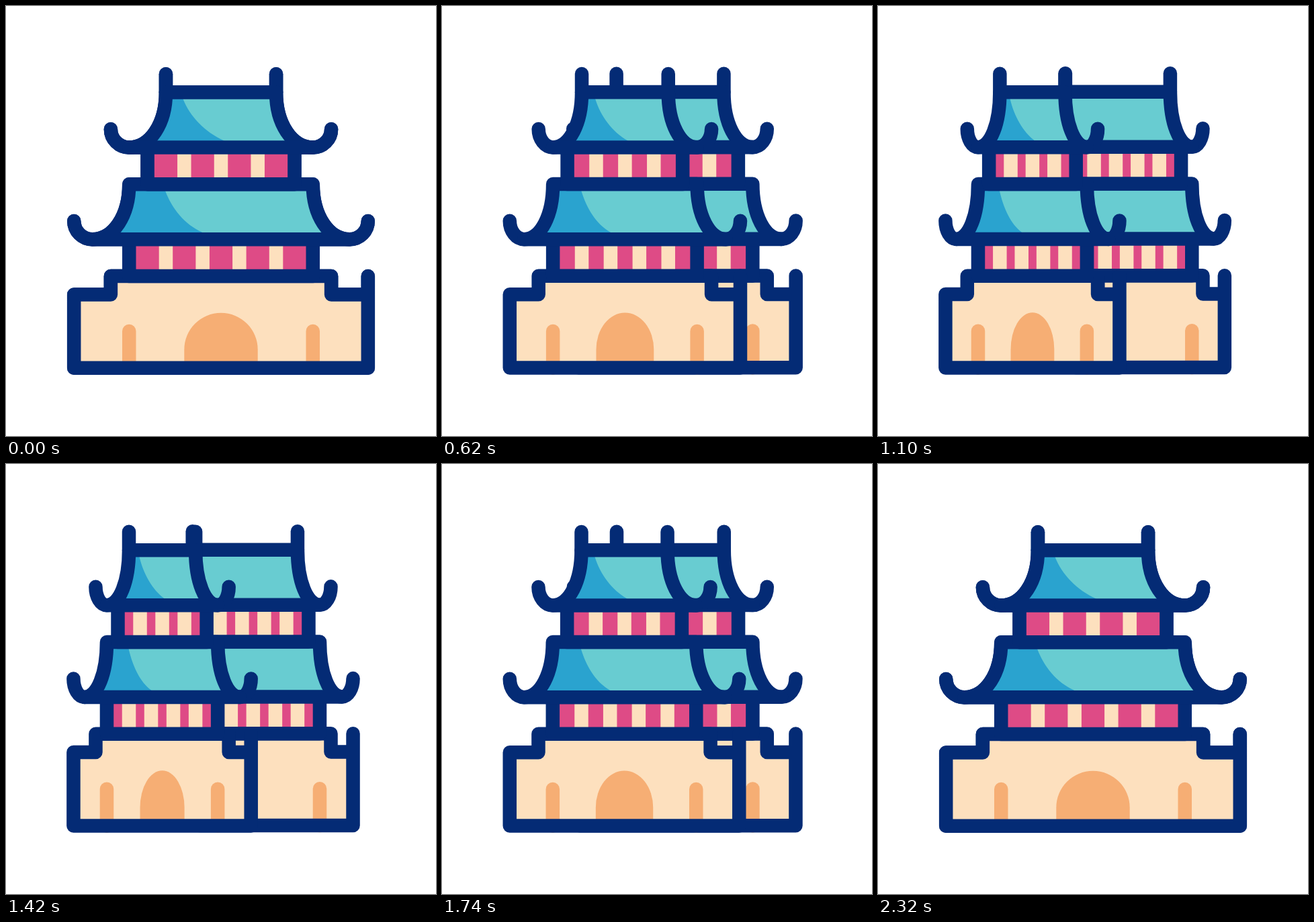
Recreate the animation shown at these times as an HTML page with a canvas. Size 640x640 px, loop 2.4 s.

```html
<!DOCTYPE html>
<html lang="en">
<head>
<meta charset="utf-8">
<title>Turning castle</title>
<style>
html, body { margin: 0; width: 100%; height: 100%; overflow: hidden; background: #fff; }
canvas { display: block; width: 640px; height: 640px; }
</style>
</head>
<body>
<canvas id="stage" width="640" height="640"></canvas>
<script>
const ctx = document.getElementById('stage').getContext('2d');
const NAVY = '#042b75', TEAL = '#68ccd1', BLUE = '#2aa3cf';
const PINK = '#de4b86', CREAM = '#fde0be', ORANGE = '#f6ae74';
const LOOP = 2400;
// The castle sits on a grid from -8 to 8 in both directions.
const UNIT = 27.35, MIN_SCALE = .591, SIDE_SHIFT = 23;
const grid = v => 320 + v * UNIT;

const ease = x => {
  x = Math.min(1, Math.max(0, x));
  return x < .5 ? 4 * x ** 3 : 1 - 4 * (1 - x) ** 3;
};
const turnAt = t => t < 1200 ? ease((t - 20) / 1180) : 1 - ease((t - 1200) / 1110);

function fill(color) {
  ctx.fillStyle = color;
  ctx.fill();
}

function stroke(color = NAVY, cap = 'round') {
  ctx.strokeStyle = color;
  ctx.lineCap = cap;
  ctx.stroke();
}

// Points are [x, y] in grid units; X projects x onto the turned wall.
function trace(X, points) {
  ctx.beginPath();
  points.forEach(([x, y]) => ctx.lineTo(X(x), grid(y)));
}

function line(X, points, color, cap) {
  trace(X, points);
  stroke(color, cap);
}

function roof(X, r, y, shade) {
  const l = -r, b = y + 3;
  const curve = (x1, y1, x2, y2, x, y3) =>
    ctx.bezierCurveTo(X(x1), grid(y1), X(x2), grid(y2), X(x), grid(y3));
  const slopes = () => {
    curve(l - .85, b, l, y + 1.7, l, y);
    ctx.lineTo(X(r), grid(y));
    curve(r, y + 1.7, r + .85, b, r + 2, b);
  };

  ctx.beginPath();
  ctx.moveTo(X(l - 2), grid(b));
  slopes();
  ctx.closePath();
  fill(TEAL);

  if (shade) {
    const [x0, x1] = shade;
    ctx.save();
    ctx.clip();
    trace(X, [[l - 2, b], [l - 2, y], [x0 - .1, y], [x0, y + .37]]);
    curve(x0 + .37, y + 1.32, x1 - 1.03, y + 2.16, x1, y + 2.63);
    ctx.lineTo(X(x1 + .7), grid(b));
    fill(BLUE);
    ctx.restore();
  }

  ctx.beginPath();
  ctx.moveTo(X(l - 3), grid(b - 1));
  curve(l - 3, b - .45, l - 2.55, b, l - 2, b);
  slopes();
  curve(r + 2.55, b, r + 3, b - .45, r + 3, b - 1);
  stroke();
  line(X, [[l - 2, b], [r + 2, b]]);
}

function storey(X, S, r, y, stripes) {
  const b = y + 2;
  trace(X, [[-r, y], [r, y], [r, b], [-r, b]]);
  fill(PINK);
  for (const x of stripes) line(S, [[x, y], [x, b]], CREAM, 'butt');
  line(X, [[-r, y], [-r, b], [r, b], [r, y]], NAVY, 'butt');
}

function base(X, front) {
  trace(X, [[-8, 4], [-6, 4], [-6, 3], [6, 3], [6, 4], [8, 4], [8, 8], [-8, 8]]);
  fill(CREAM);
  for (const x of front ? [-5, 5] : [5]) line(X, [[x, 6], [x, 8]], ORANGE);
  if (front) {
    ctx.beginPath();
    ctx.ellipse(X(0), grid(7), X(2) - X(0), 2 * UNIT, 0, Math.PI, 0);
    ctx.lineTo(X(2), grid(8));
    ctx.lineTo(X(-2), grid(8));
    fill(ORANGE);
  }
  line(X, [[8, 3], [8, 8], [-8, 8], [-8, 4], [-6, 4],
           [-6, 3], [6, 3], [6, 4], [8, 4]]);
}

// project(r) gives the x projection of a level of half width r; S places stripes.
function castle(project, S, front) {
  const top = project(3), mid = project(5);
  base(project(6), front);
  storey(mid, S, 5, 1, [-3, -1, 1, 3]);
  roof(mid, 5, -2, front && [-3.03, -.99]);
  storey(top, S, 4, -4, front ? [-2, 0, 2] : [-4, -2, 0, 2]);
  for (const x of [-3, 3]) line(top, [[x, -8], [x, -7]]);
  roof(top, 3, -7, front && [-2.06, .17]);
}

function draw(p) {
  const scale = 1 - p * (1 - MIN_SCALE);
  const fromLeft = (x, k) => grid(-8 + (x + 8) * k);
  const frontX = x => fromLeft(x, scale);
  const rightX = x => grid(8 + (x - 8) * scale) - SIDE_SHIFT * p;
  // The left half of the side wall slides towards the front corner.
  const sideX = r => {
    const corner = grid(-r) + (fromLeft(r, MIN_SCALE) - grid(-r)) * p;
    return x => x < 0 ? corner + (x + r) * UNIT * scale : rightX(x);
  };

  ctx.fillStyle = '#fff';
  ctx.fillRect(0, 0, 640, 640);
  ctx.lineWidth = .75 * UNIT;
  ctx.lineJoin = 'round';
  ctx.save();
  ctx.translate(0, -.9 * p);
  castle(sideX, rightX, false);
  ctx.restore();
  ctx.save();
  ctx.translate(-.8 * p, -.4 * p);
  castle(() => frontX, frontX, true);
  ctx.restore();
}

function tick() {
  draw(turnAt(performance.now() % LOOP));
  requestAnimationFrame(tick);
}
tick();
</script>
</body>
</html>
```
